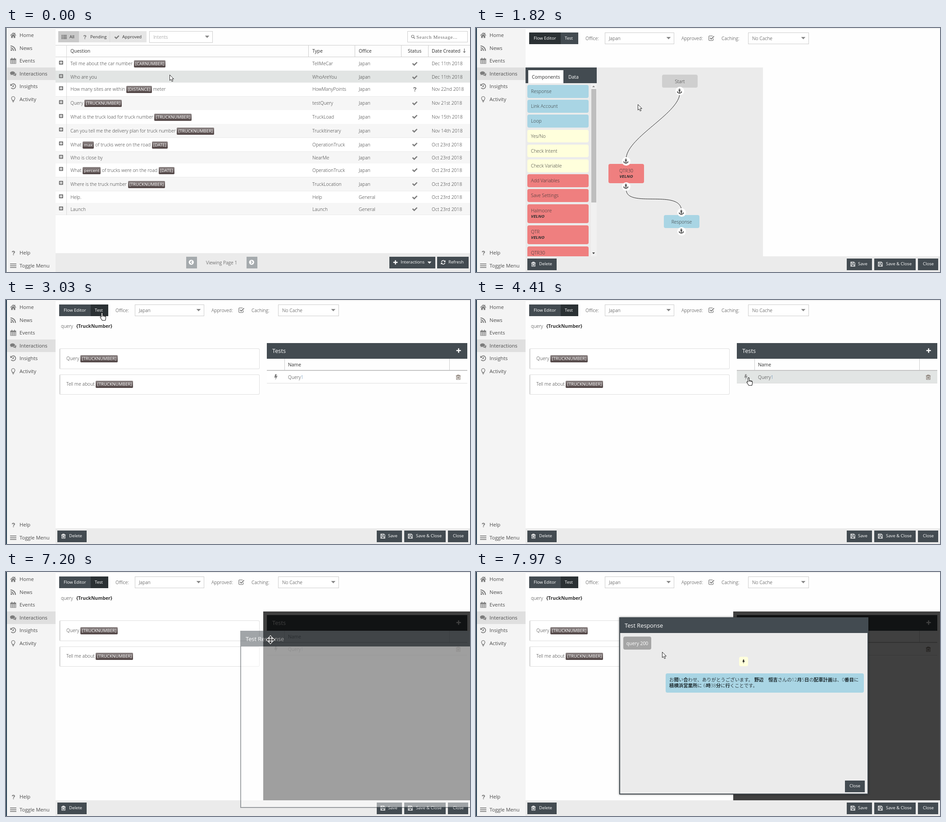
An HTML page that plays this animation: 1030 by 544 pixels, repeating every 8000 ms.

```html
<!DOCTYPE html>
<html lang="en">
<head>
<meta charset="utf-8">
<title>Interaction editor</title>
<style>
html, body { margin: 0; width: 100%; height: 100%; overflow: hidden; background: #fff; }
#stage { position: absolute; left: 0; top: 0; width: 1030px; height: 544px; overflow: hidden;
  background: #fefefe; font: 300 10.4px/16px "Open Sans", sans-serif; color: #303030; }
#stage div, #stage svg { position: absolute; box-sizing: border-box; }
svg { overflow: visible; fill: currentColor; }
.s { fill: none; stroke: currentColor; stroke-width: 1.6; }
.t { white-space: nowrap; }
.c { transform: translateX(-50%); }
.r { font-weight: 400; }
.nav { font-size: 11.2px; font-weight: 400; color: #4c4c4c; }
.btn { font-size: 9.6px; font-weight: 400; }
.w { color: #fff; }
.title { font-size: 12.8px; font-weight: 400; color: #fff; }
.tag { display: inline-block; padding: 0 3px; border-radius: 2px; font-size: 9.6px; font-weight: 400;
  line-height: 16px; color: #fff; background: linear-gradient(#8d8585, #4f4343); }
.soft { border-radius: 4px; }
.field { border: 1px solid #ccc; background: #fff; }
.card { border: 1px solid #dedede; border-left-width: 3px; border-radius: 3px; background: #fff; }
.search { font: 11px/16px "Liberation Serif", serif; letter-spacing: .7px; color: #666; }
.kind { font-size: 9.6px; font-weight: 700; font-style: italic; }
.jp { font-family: "Open Sans", "Noto Sans CJK JP", "Noto Sans CJK", sans-serif; line-height: 13.6px; white-space: nowrap; color: #2c383e; }
.jp b { font-weight: 700; color: #1c282c; }
</style>
</head>
<body>
<div id="stage"></div>
<script>
const LOOP = 8000, DARK = '#434b51', PRESSED = '#2b3134', GREY = '#ebebeb', ICON = '#7c7c7c';
const BLUE = '#a9d5e4', YELLOW = '#ffffdc', RED = '#ef7f7f';
const KIND = 'VELNO';

const icons = {
  home: '<path d="M8 1 .3 8.3l1.2 1.2L8 3.7l6.5 5.8 1.2-1.2L13 5.800V2h-2.200v1.700zM2.800 9.800V15h4v-4h2.400v4h4V9.800L8 5.200z"/>',
  rss: '<circle cx="3.300" cy="12.700" r="2.100"/><path class="s" style="stroke-width:2.400" d="M1.200 7.200a7.500 7.500 0 0 1 7.600 7.600M1.200 2.300a12.500 12.500 0 0 1 12.500 12.500"/>',
  calendar: '<path class="s" style="stroke-width:1.200" d="M1.200 3.500h13.600V15H1.200zM1.200 7h13.600M1.200 11h13.600M5.700 7v8M10.300 7v8"/><path d="M1.200 3h13.600v3H1.200zM3.800.5h2v3.500h-2zM10.200.5h2v3.500h-2z"/>',
  comments: '<path d="M6.300 2C2.800 2 0 3.900 0 6.300c0 1.400.9 2.600 2.300 3.400L1 11.800l3.500-1.300c4.700.6 8.100-1.500 8.100-4.200C12.600 3.900 9.800 2 6.300 2zM13.700 6c.2 3-2.700 5.700-7.200 5.800 1.500 1.100 3.600 1.400 5.400 1l3.500 1.500-1.300-2.200C16.600 10.600 16.500 7.400 13.700 6z"/>',
  history: '<path class="s" style="stroke-width:2" d="M2.600 4.500a6.300 6.300 0 1 1 .3 7.400M8.400 4.500v4.300H5.500"/><path d="M.6 1.300v5.500h5.500z"/>',
  bulb: '<path class="s" d="M6 11.200C6 9 3.700 8.300 3.700 5.300a4.300 4.300 0 0 1 8.600 0c0 3-2.300 3.700-2.300 5.900zM6 13h4M6.700 15h2.600"/>',
  help: '<path class="s" style="stroke-width:2.800" d="M4.300 5.500C4.500 1.500 11.700 1.400 11.700 5.400 11.700 8 8 7.700 8 10.700"/><path d="M6.500 12.300h3v2.800h-3z"/>',
  bars: '<path d="M0 2.500h16v2H0zM0 7h16v2H0zM0 11.500h16v2H0z"/>',
  list: '<path d="M0 2h4v3H0zM5 2h11v3H5zM0 6.500h4v3H0zM5 6.500h11v3H5zM0 11h4v3H0zM5 11h11v3H5z"/>',
  check: '<path d="M.7 8.600 3 6.300l3.400 3.300L13 3l2.300 2.300-8.900 8.900z"/>',
  add: '<path fill-rule="evenodd" d="M3 1h10q2 0 2 2v10q0 2-2 2H3q-2 0-2-2V3q0-2 2-2zM6.800 3.500v3.300H3.500v2.400h3.300v3.300h2.400V9.200h3.300V6.800H9.200V3.500z"/>',
  plus: '<path d="M6.300 1h3.400v5.300H15v3.400H9.700V15H6.300V9.700H1V6.300h5.300z"/>',
  search: '<circle class="s" style="stroke-width:2" cx="6.500" cy="6.500" r="4.800"/><path class="s" style="stroke-width:2.600" d="m10 10 4.800 4.800"/>',
  caret: '<path d="M1 4.500h14L8 12z"/>',
  down: '<path class="s" d="M8 1v13M4.500 10.500 8 14l3.500-3.500"/>',
  prev: '<circle cx="8" cy="8" r="7.200"/><path class="s" style="stroke:#a5aaad;stroke-width:2.400" d="M9.800 4 5.800 8l4 4"/>',
  next: '<circle cx="8" cy="8" r="7.200"/><path class="s" style="stroke:#a5aaad;stroke-width:2.400" d="m6.200 4 4 4-4 4"/>',
  refresh: '<path class="s" style="stroke-width:2.200" d="M2 6.800a6.200 6.200 0 0 1 11-2.300M14 9.200a6.200 6.200 0 0 1-11 2.300"/><path d="M15.300 1v6h-6zM.7 15V9h6z"/>',
  trash: '<path class="s" d="M2.800 4.500h10.400V15H2.800zM1 3.800h14M5.500 3.500V1.300h5v2.200M6 7v5.500M8 7v5.500M10 7v5.500"/>',
  save: '<path class="s" d="M1.300 1.300h10.400l3 3v10.400H1.300zM4 14.500V9.500h8v5M4 1.500v4.500h6V1.500"/>',
  tick: '<path class="s" d="M13 9v3.500q0 2-2 2H3q-2 0-2-2V4q0-2 2-2h8.500"/><path class="s" style="stroke-width:2.400" d="m4.200 7.300 3.300 3.300 7.700-7.700"/>',
  anchor: '<circle class="s" cx="8" cy="3" r="1.900"/><path class="s" style="stroke-width:2" d="M8 5v9.500M4.800 7.300h6.400M2 10c.5 3 3 4.500 6 4.500s5.500-1.500 6-4.500"/><path d="M.6 12V8.300l3.600 2.400zM15.400 12V8.300l-3.600 2.400z"/>',
  bolt: '<path d="M6.300.5h4L8.600 5.200l3.900-.9L6.400 15.600 8 8.500l-3.900 1z"/>'
};

const px = (x, y, w, h) => `left:${x}px;top:${y}px;width:${w}px;height:${h}px;`;
const box = (x, y, w, h, style = '', html = '', attrs = '') => `<div ${attrs} style="${px(x, y, w, h)}${style}">${html}</div>`;
const fill = (x, y, w, h, color, attrs) => box(x, y, w, h, 'background:' + color, '', attrs);
const text = (x, y, s, cls = '') => `<div class="t ${cls}" style="left:${x}px;top:${y - 8}px">${s}</div>`;
const icon = (name, x, y, size, color = ICON) =>
  `<svg viewBox="0 0 16 16" style="${px(x - size / 2, y - size / 2, size, size)}color:${color}">${icons[name]}</svg>`;
const group = (id, html) => `<div id="${id}" style="left:0;top:0">${html}</div>`;
const tags = s => s.replace(/\[\w+\]|<\w+>/g, m => `<span class="tag">${m.replace(/[<>]/g, '')}</span>`);
const button = (x, y, w, label, tx, ic) =>
  fill(x, y, w, 25.600, DARK) + text(tx, y + 12, label, 'btn w') + (ic ? icon(ic, x + 13, y + 12.5, 11, '#fff') : '');
const combo = (x, y, w, label, cls = '') =>
  box(x, y, w, 25.600, '', '', 'class="field"') + text(x + 9, y + 13, label, cls) + icon('caret', x + w - 13, y + 12.5, 11, '#888');

function sidebar() {
  const items = [['home', 'Home', 16], ['rss', 'News', 45], ['calendar', 'Events', 73], ['comments', 'Interactions', 102],
    ['history', 'Insights', 130], ['bulb', 'Activity', 159], ['help', 'Help', 501], ['bars', 'Toggle Menu', 530]];
  return fill(0, 0, 110, 544, '#f4f4f4') + fill(0, 0, 1, 544, '#24343f') + fill(2, 87.500, 108, 28.500, '#dfdfdf') +
    items.map(([ic, label, y]) => icon(ic, 16, y, ic == 'help' ? 11 : 14) + text(30, y, label, 'nav')).join('');
}

function listScreen() {
  const rows = [
    ['Tell me about the car number [CARNUMBER]', 'TellMeCar', 'Dec 11th'],
    ['Who are you', 'WhoAreYou', 'Dec 11th'],
    ['How many sites are within [DISTANCE] meter', 'HowManyPoints', 'Nov 22nd'],
    ['Query [TRUCKNUMBER]', 'testQuery', 'Nov 21st'],
    ['What is the truck load for truck number [TRUCKNUMBER]', 'TruckLoad', 'Nov 15th'],
    ['Can you tell me the delivery plan for truck number [TRUCKNUMBER]', 'TruckItinerary', 'Nov 14th'],
    ['What <max> of trucks were on the road [DATE]', 'OperationTruck', 'Oct 23rd'],
    ['Who is close by', 'NearMe', 'Oct 23rd'],
    ['What <percent> of trucks were on the road [DATE]', 'OperationTruck', 'Oct 23rd'],
    ['Where is the truck number [TRUCKNUMBER]', 'TruckLocation', 'Oct 23rd'],
    ['Help.', 'Help', 'Oct 23rd'],
    ['Launch', 'Launch', 'Oct 23rd']];
  let html = fill(116, 7, 46, 25, '#cacaca') + fill(162, 7, 150, 25, '#e6e6e6') + fill(230, 7, 1, 25, '#d8d8d8') +
    icon('list', 129, 19.500, 12) + text(141, 19.500, 'All', 'btn') + icon('help', 175, 19.500, 10) + text(187, 19.500, 'Pending', 'btn') +
    icon('check', 246, 19.500, 12) + text(258, 19.500, 'Approved', 'btn') +
    `<span style="color:#888">${combo(318, 7, 141, 'Intents')}</span>` +
    box(891, 7, 134, 25, '', '', 'class="field"') + icon('search', 904, 20, 9.500) + text(911, 20, 'Search Message...', 'search') +
    fill(110, 37.500, 920, 1, '#ccc') + fill(110, 64, 920, 1, '#ccc');
  for (const [x, s] of [[143, 'Question'], [680, 'Type'], [783, 'Office'], [892, 'Status'], [945, 'Date Created']]) html += text(x, 51, s, 'r');
  html += icon('down', 1017, 50, 11, '#666');
  let y = 64.500;
  rows.forEach(([q, type, date], i) => {
    const h = /[<[]/.test(q) ? 30.800 : 26.400, mid = y + h / 2 - (h > 30 ? .8 : -.5);
    html += fill(110, y, 920, h, i == 1 ? '#e2e5e4' : i % 2 ? '#f6f6f6' : '#fff', `id="row${i}"`) +
      fill(110, y + h - .5, 920, 1, '#ebebeb') + icon('add', 122.500, mid - 2, 10.500) + text(143, mid, tags(q)) + text(680, mid, type) +
      text(783, mid, i > 9 ? 'General' : 'Japan') + icon(i == 2 ? 'help' : 'check', 907, mid, i == 2 ? 11 : 13) + text(945, mid, date + ' 2018');
    y += h;
  });
  for (const x of [671, 774, 877, 937]) html += fill(x, 38, 1, 26, '#ccc');
  html += fill(134, 38, 1, y - 38, '#d8d8d8') + fill(110, 502, 920, 42, GREY);
  for (const [x, ic] of [[400, 'prev'], [534, 'next']]) html += fill(x, 510, 23.500, 25.600, '#a5aaad') + icon(ic, x + 11.700, 522.500, 12.500, '#fff');
  return html + text(444, 523, 'Viewing Page 1') + button(851, 510, 102, 'Interactions', 876, 'plus') +
    icon('caret', 940, 523, 10, '#fff') + button(957, 510, 70, 'Refresh', 982, 'refresh');
}

const editorFrame = () => fill(110, 0, 920, 544, '#fefefe') + fill(0, 0, 1.6, 544, '#1b364a') +
  fill(118, 10, 70, 25.600, DARK, 'id="flowTab"') + fill(188, 10, 39, 25.600, DARK, 'id="testTab"') +
  text(128, 22.500, 'Flow Editor', 'btn w') + text(197, 22.500, 'Test', 'btn w') +
  text(243, 23, 'Office:') + combo(286, 10, 154, 'Japan') + text(456, 23, 'Approved:') + icon('tick', 522, 22.500, 13) +
  text(545, 23, 'Caching:') + combo(604, 10, 135, 'No Cache') +
  fill(110, 509, 920, 35, GREY) + button(114, 514, 65, 'Delete', 140, 'trash') + button(823, 514, 56, 'Save', 848, 'save') +
  button(884, 514, 92, 'Save &amp; Close', 910, 'save') + button(981, 514, 45, 'Close', 992);

function palette() {
  const items = [['Response', BLUE], ['Link Account', BLUE], ['Loop', BLUE], ['Yes/No', YELLOW], ['Check Intent', YELLOW],
    ['Check Variable', YELLOW], ['Add Variables', RED], ['Save Settings', RED], ['Halmoore', RED, 1], ['QTR', RED, 1], ['QTR30', RED, 1]];
  let y = 4, inner = '';
  for (const [label, color, two] of items) {
    const h = two ? 42.500 : 28.700;
    inner += box(4, y, 136, h, 'background:' + color, text(8, 14, label) + (two ? text(8, 27.500, KIND, 'kind') : ''), 'class="soft"');
    y += h + 4.500;
  }
  return fill(110, 88, 527, 421, GREY) + fill(110, 88, 158, 35, DARK) + fill(116, 94, 78, 29, '#fff') +
    text(124, 109, 'Components', 'r') + text(205, 109, 'Data', 'r w') + box(110, 123, 158, 386, 'overflow:hidden', inner) +
    fill(255, 123, 12.500, 386, '#f1f1f1') + fill(256, 136, 10.500, 253, '#bebebe') +
    `<svg style="left:0;top:0" width="1" height="1"><path fill="#888" d="M258 132h6l-3-3.500z"/><path fill="#333" d="M258 500.500h6l-3 3.500z"/></svg>`;
}

const node = (x, y, h, color, label, kind) => box(x, y, 79, h, 'background:' + color,
  text(39.500, 14.500, label, 'c') + (kind ? text(39.500, 28, kind, 'c kind') : ''), 'class="soft"');
const anchor = (x, y) => box(x - 9.500, y - 9.500, 19, 19, 'background:#fff;border-radius:50%') + icon('anchor', x, y, 11.500, '#333');
const wires = () => `<svg style="left:0;top:0" width="1" height="1"><path class="s" style="color:#222;stroke-width:1"
  d="M452 149C445 192 340 243 333.500 288M333.500 362C337 400 446 362 455.500 402"/></svg>`;
const nodes = () => node(413, 104, 29, '#cfcfcf', 'Start') + node(294, 303, 43, RED, 'QTR30', KIND) + node(417, 417, 29, BLUE, 'Response') +
  anchor(452, 140.500) + anchor(333, 297) + anchor(333, 353) + anchor(456, 411) + anchor(456, 453);

const testPane = () => fill(110, 40, 920, 469, '#fefefe') + text(122, 58, 'query') + text(156, 58, '<b>{TruckNumber}</b>') +
  box(118, 108, 445, 45.500, '', '', 'class="card"') + text(134, 129.500, tags('Query [TRUCKNUMBER]')) +
  box(118, 166, 445, 45, '', '', 'class="card"') + text(134, 187, tags('Tell me about [TRUCKNUMBER]')) +
  fill(579, 96, 445, 35, DARK) + text(591, 113, 'Tests', 'title') + icon('plus', 1005, 113, 11.500, '#fff') +
  text(626, 144, 'Name', 'r') + fill(618, 131, 1, 26, '#ccc') + fill(984, 131, 1, 26, '#ccc') +
  fill(579, 157, 445, 28, '#fff', 'id="testRow"') + fill(579, 156, 445, 1.500, '#c4c4c4') + fill(579, 184.500, 445, 1, '#dcdcdc') +
  group('bolt', icon('bolt', 599, 172, 14, 'inherit')) + text(626, 172, 'Query<span style="color:#4a7eb0">1</span>') + icon('trash', 1004, 172, 12, '#84796f');

const reply = ['お問い合わせ、ありがとうございます。 野辺　恒吉さんの12月5日の配車計画は、0番目に', '積横浜営業所に 6時38分に行くことです。']
  .join('<br>').replace(/[\u4e00-\u9fff]+/g, '<b>$&</b>');
const frame = (id, body, html) => box(0, 0, 553, 395, `background:${body};border:2px solid ${DARK}`,
  fill(-2, -2, 553, 35, DARK) + text(10, 15.500, 'Test Response', 'title') + html, `id="${id}"`);
const dialog = () => frame('ghost', '#fff', '') + frame('panel', GREY + ';box-shadow:0 0 4px rgba(0,0,0,.55)',
  box(7, 41, 62, 29, 'background:#a5a5a5', text(31, 14.500, 'query 200', 'c r w'), 'class="soft"') +
  box(264, 86, 20, 21, 'background:' + YELLOW, icon('bolt', 10, 10.500, 10, '#222'), 'class="soft"') +
  box(101, 123, 440, 43, 'background:' + BLUE, box(8, 7.500, 430, 28, '', reply, 'class="jp"'), 'class="soft"') +
  button(499, 362, 44, 'Close', 509));

const pointer = (id, d, style) => `<svg id="${id}" style="left:0;top:0" width="1" height="1"><path d="${d}" style="${style}"/></svg>`;
const cursor = () =>
  pointer('arrow', 'M.5.5V13L3.300 10.400 5.400 15.200 7.600 14.200 5.500 9.600H9.400Z', 'fill:#fff;stroke:#222') +
  pointer('hand', 'M-1.300 1.500a1.400 1.400 0 0 1 2.800 0V6.500l4.600.9q2.400.5 2.400 2.600V12q0 2.400-1.200 5.500H.6L-3.700 11Q-4.300 9.300-3 9q1-.2 1.700 1.300ZM1.500 6.500V9M4 7v2.300M6.300 7.500v2.200', 'fill:#fff;stroke:#222;stroke-width:1.100') +
  pointer('cross', 'M0-8.500 3-5H.8v4.200H5V-3L8.500 0 5 3V.8H.8V5H3L0 8.500-3 5h2.200V.8H-5V3L-8.500 0-5-3v2.200h4.200V-5H-3Z', 'fill:#222;stroke:#fff;stroke-width:2.400;paint-order:stroke');

document.getElementById('stage').innerHTML = sidebar() + group('list', listScreen()) +
  group('editor', editorFrame() + group('palette', palette()) + group('wires', wires()) + group('nodes', nodes()) + group('test', testPane())) +
  fill(110, 0, 920, 2, '#f0f0f0') + fill(571, 88, 459, 421, 'rgba(0,0,0,.75)', 'id="mask"') + group('dialog', dialog()) + group('cursor', cursor());

// Stepped timelines: {ms: declaration}
let css = '';
function anim(id, steps) {
  css += `@keyframes ${id}{${Object.entries(steps).map(([ms, d]) => `${ms * 100 / LOOP}%{${d}}`).join('')}}
#${id}{animation:${id} ${LOOP}ms step-end infinite}`;
}
// Visible during each [from, to) span
function show(id, ...spans) {
  const steps = { 0: 'opacity:0' };
  for (const [from, to] of spans) { steps[from] = 'opacity:1'; if (to) steps[to] = 'opacity:0'; }
  anim(id, steps);
}
const move = (id, ...path) => anim(id, Object.fromEntries(path.map(([ms, x, y]) => [ms, `transform:translate(${x}px,${y}px)`])));
const color = (id, ...list) => anim(id, Object.fromEntries(list.map(([ms, c]) => [ms, 'background:' + c])));

show('list', [0, 1360]);
show('editor', [1360]);
show('palette', [1510, 2880]);
show('nodes', [1660, 2880]);
show('wires', [1820, 2880]);
show('test', [2880]);
show('mask', [6130]);
show('panel', [6130, 7200], [7660]);
anim('ghost', { 0: 'opacity:0', 7200: 'opacity:.5', 7660: 'opacity:0' });
color('row2', [0, '#fff'], [600, '#e2e5e4'], [900, '#fff']);
color('row3', [0, '#f6f6f6'], [900, '#e2e5e4']);
color('flowTab', [0, PRESSED], [2880, DARK]);
color('testTab', [0, DARK], [2880, PRESSED]);
color('testRow', [0, '#fff'], [4100, '#e2e5e4'], [6130, '#fff']);
anim('bolt', { 0: 'color:#7c7c7c', 4410: 'color:#8e8e8e' });
move('dialog', [0, 526, 131], [7200, 520, 131], [7350, 428, 118], [7510, 318, 101]);
show('arrow', [0, 2880], [3350, 4270], [6130, 6890], [7970]);
show('hand', [2880, 3350], [4270, 6130]);
show('cross', [6890, 7970]);
move('cursor', [0, 363, 104], [300, 363, 107], [450, 362, 115], [600, 361, 128], [750, 360, 143], [900, 360, 157], [1050, 359, 167], [1200, 359, 170],
  [2130, 354, 163], [2280, 327, 132], [2430, 280, 82], [2580, 238, 47], [2730, 216, 32], [2880, 213, 28],
  [3350, 218, 31], [3500, 262, 52], [3650, 358, 98], [3800, 468, 140], [3950, 555, 165], [4100, 594, 174], [4270, 605, 173],
  [6130, 604, 173], [6430, 616, 188], [6590, 633, 205], [6890, 628, 152], [7050, 624, 151], [7200, 587, 151],
  [7350, 505, 136], [7510, 418, 121], [7970, 413, 178]);
const sheet = document.createElement('style');
sheet.textContent = css;
document.head.append(sheet);
</script>
</body>
</html>
```
